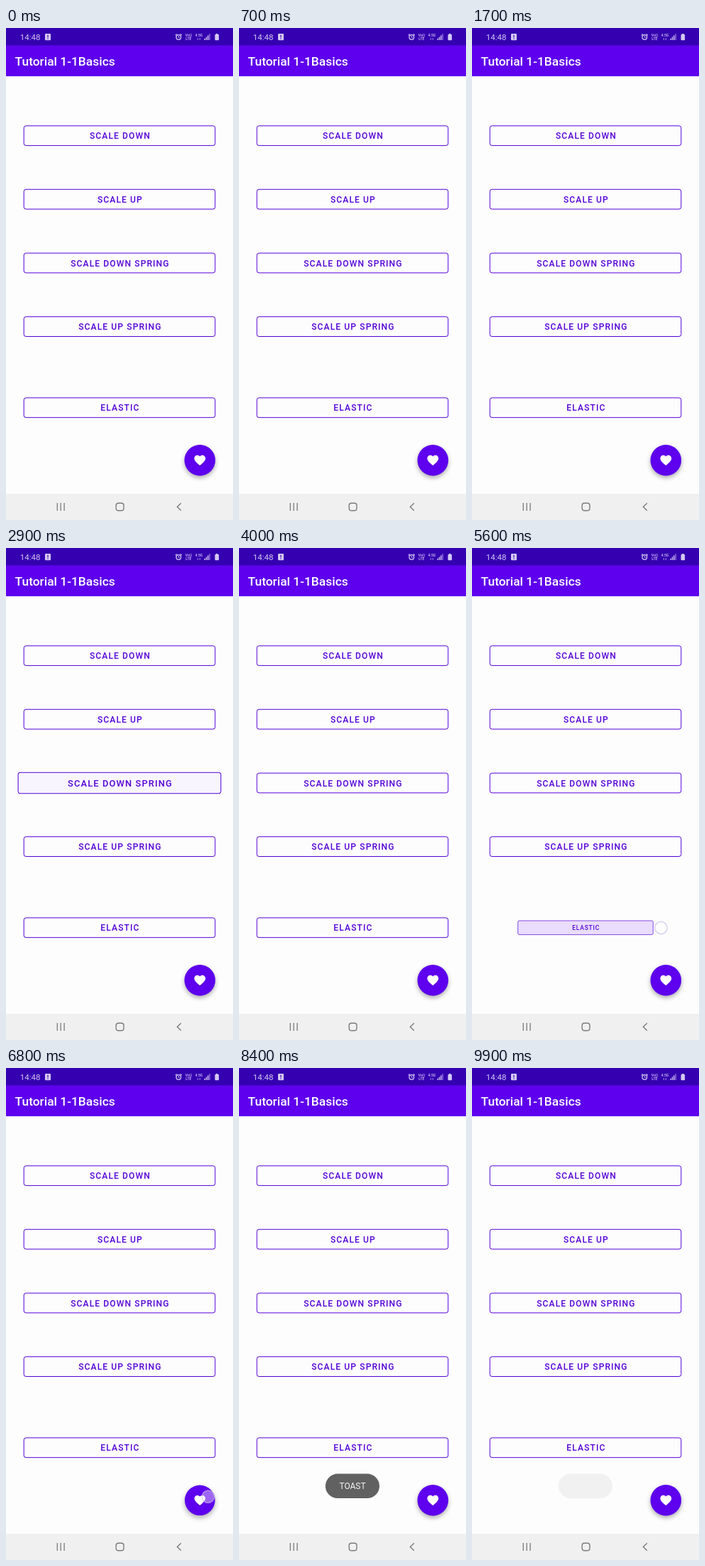
Animation of 320x693 px, one loop 10 s. Source, as an HTML page with a canvas:

```html
<!DOCTYPE html>
<html lang="en">
<head>
<meta charset="utf-8">
<title>Button animations</title>
<style>
  html, body { margin: 0; width: 100%; height: 100%; overflow: hidden; background: #fdfdfe; }
  canvas { display: block; width: 320px; height: 693px; }
</style>
</head>
<body>
<canvas id="stage"></canvas>
<script>
const W = 320, H = 693, LOOP = 10000, STEP = 100;
const canvas = document.getElementById('stage');
const ctx = canvas.getContext('2d');
const dpr = window.devicePixelRatio || 1;
canvas.width = W * dpr;
canvas.height = H * dpr;

const PURPLE = '#5e00ed', INK = '#5500d6';
const HEART = new Path2D('M12 21.35l-1.45-1.32C5.4 15.36 2 12.28 2 8.5 2 5.42 4.42 3 7.5 3' +
  'c1.74 0 3.41.81 4.5 2.09C13.09 3.81 14.76 3 16.5 3 19.58 3 22 5.42 22 8.5' +
  'c0 3.78-3.4 6.86-8.55 11.54L12 21.35z');

const BUTTONS = [
  ['SCALE DOWN', 151.7], ['SCALE UP', 241.2], ['SCALE DOWN SPRING', 331],
  ['SCALE UP SPRING', 420.6], ['ELASTIC', 534.8]
];
const FAB = 5;

// Each tap: start, length and hold in ms, peak scale, optional spring
const TAPS = [
  { id: 0, start: 300, len: 400, hold: 280, peak: 0.9 },
  { id: 1, start: 1300, len: 400, hold: 280, peak: 1.1 },
  { id: 2, start: 2500, len: 600, hold: 300, peak: 0.85, spring: true },
  { id: 3, start: 3500, len: 500, hold: 300, peak: 1.03, spring: true },
  { id: 4, start: 4500, len: 400, hold: 300, peak: 0.706 },
  { id: 4, start: 5400, len: 300, hold: 260, peak: 0.706 },
  { id: 4, start: 5900, len: 300, hold: 260, peak: 0.706 },
  { id: FAB, start: 6800, len: 1000, hold: 250, peak: 0.75, spring: true }
];

const clamp = x => Math.max(0, Math.min(1, x));
const easeInOut = x => x < 0.5 ? 2 * x * x : 1 - 2 * (1 - x) ** 2;

function pose(id, t) {
  const tap = TAPS.find(p => p.id === id && t >= p.start && t < p.start + p.len);
  if (!tap) return { scale: 1, press: 0, dot: 0 };
  const u = t - tap.start + 50;
  const v = Math.max(0, u - tap.hold);
  let amount = easeInOut(clamp(u / tap.hold));
  if (v > 0) {
    amount = tap.spring
      ? Math.exp(-0.0061 * v) * Math.cos(Math.PI * v / 150)
      : 1 - easeInOut(clamp(v / 120));
  }
  return {
    scale: 1 + (tap.peak - 1) * amount,
    press: clamp(u / 150) * (1 - clamp(v / 200)),
    dot: 1 - clamp(v / 90)
  };
}

function roundRect(x, y, w, h, r) {
  ctx.beginPath();
  ctx.roundRect(x, y, w, h, r);
}

function text(str, x, y, size, color, { weight = 400, align = 'left', spacing = 0 } = {}) {
  ctx.font = `${weight} ${size}px Roboto, sans-serif`;
  ctx.letterSpacing = spacing + 'px';
  ctx.textAlign = align;
  ctx.fillStyle = color;
  ctx.fillText(str, x, y);
}

function line(color, width, ...pts) {
  ctx.beginPath();
  for (let i = 0; i < pts.length; i += 2) ctx.lineTo(pts[i], pts[i + 1]);
  ctx.strokeStyle = color;
  ctx.lineWidth = width;
  ctx.stroke();
}

function circle(x, y, r) {
  ctx.beginPath();
  ctx.arc(x, y, r, 0, Math.PI * 2);
}

function rect(color, x, y, w, h) {
  ctx.fillStyle = color;
  ctx.fillRect(x, y, w, h);
}

function touchDot(x, y, alpha) {
  if (alpha <= 0) return;
  ctx.save();
  ctx.globalAlpha = alpha;
  circle(x, y, 8.7);
  ctx.fillStyle = 'rgba(255,255,255,.4)';
  ctx.fill();
  ctx.strokeStyle = 'rgba(196,184,226,.65)';
  ctx.lineWidth = 1.5;
  ctx.stroke();
  ctx.restore();
}

function statusBar() {
  const pale = '#d5c8f3', bar = '#3400b0';
  rect(bar, 0, 0, W, 24.5);
  text('14:48', 19.8, 17, 11.5, pale);

  roundRect(55, 8, 8, 9.2, 1);
  ctx.fillStyle = pale;
  ctx.fill();
  rect(bar, 58.4, 9.8, 1.2, 3.4);
  rect(bar, 58.4, 14.2, 1.2, 1.3);

  circle(243.3, 13, 3.3);
  ctx.strokeStyle = pale;
  ctx.lineWidth = 1.3;
  ctx.stroke();
  line(pale, 1, 243.3, 11, 243.3, 13.2, 244.8, 13.8);
  line(pale, 1.2, 238.8, 10.4, 240.8, 8.5);
  line(pale, 1.2, 245.8, 8.5, 247.8, 10.4);

  const small = { weight: 500, align: 'center' };
  text('Vo))', 257.6, 12.2, 5, pale, small);
  text('LTE', 257.4, 17.2, 5, pale, small);
  text('4.5G', 272, 12.2, 5, pale, small);
  line(pale, 0.7, 270.3, 14, 270.3, 17);
  line(pale, 0.7, 273.3, 14, 273.3, 17);

  for (let i = 0; i < 4; i++) {
    const h = 2.2 + i * 2.2;
    rect(i < 3 ? pale : 'rgba(213,200,243,.6)', 279.5 + i * 2.3, 17 - h, 1.4, h);
  }
  rect(pale, 295.9, 8, 2.6, 1.5);
  roundRect(294.5, 9, 5.6, 8.2, 1);
  ctx.fillStyle = pale;
  ctx.fill();
}

function navBar() {
  const gray = '#7b7b7b';
  rect('#f0f0f0', 0, 656, W, 37);
  for (const x of [72.3, 77.2, 82.1]) line(gray, 1.3, x, 669, x, 680);
  roundRect(155.2, 669.2, 10.8, 10.6, 3.3);
  ctx.strokeStyle = gray;
  ctx.lineWidth = 1.4;
  ctx.stroke();
  line(gray, 1.4, 246.8, 669.3, 241.4, 674.5, 246.8, 679.7);
}

function button([label, y], { scale, press, dot }) {
  ctx.save();
  ctx.translate(160, y);
  ctx.scale(scale, scale);
  roundRect(-134.8, -13.9, 269.6, 27.8, 3);
  ctx.fillStyle = `rgba(98,0,238,${0.13 * press})`;
  ctx.fill();
  ctx.strokeStyle = INK;
  ctx.lineWidth = 1;
  ctx.stroke();
  text(label, 0.9, 4.6, 12.1, INK, { weight: 500, align: 'center', spacing: 1.08 });
  ctx.restore();
  touchDot(266.5, y + 0.2, dot);
}

function fab({ scale, press, dot }) {
  ctx.save();
  ctx.translate(273.3, 608.9);
  ctx.scale(scale, scale);
  circle(0, 0, 21.8);
  ctx.shadowColor = 'rgba(0,0,0,.32)';
  ctx.shadowBlur = (6 + 3 * press) * dpr;
  ctx.shadowOffsetY = (3 + press) * dpr;
  ctx.fillStyle = PURPLE;
  ctx.fill();
  ctx.shadowColor = 'transparent';
  ctx.scale(0.79, 0.79);
  ctx.translate(-12, -12);
  ctx.fillStyle = '#fff';
  ctx.fill(HEART);
  ctx.restore();
  touchDot(285, 603.7, dot);
}

function toast(t) {
  const alpha = t < 9450 ? clamp((t - 7050) / 500) : clamp(1 - (t - 9400) / 540);
  if (alpha <= 0) return;
  ctx.save();
  ctx.globalAlpha = alpha;
  roundRect(121.8, 571.6, 76.2, 34.4, 17.2);
  ctx.fillStyle = '#616161';
  ctx.fill();
  text('TOAST', 160, 593, 12, '#f4f4f4', { align: 'center' });
  ctx.restore();
}

function draw(t) {
  ctx.setTransform(dpr, 0, 0, dpr, 0, 0);
  rect('#fdfdfe', 0, 0, W, H);
  rect(PURPLE, 0, 24, W, 44);
  statusBar();
  text('Tutorial 1-1Basics', 12.5, 52.8, 17.4, '#fff', { weight: 500 });
  BUTTONS.forEach((b, i) => button(b, pose(i, t)));
  fab(pose(FAB, t));
  toast(t);
  navBar();
}

const begin = performance.now();
function tick() {
  const t = (performance.now() - begin) % LOOP;
  draw(Math.floor(t / STEP) * STEP);
  requestAnimationFrame(tick);
}
tick();
</script>
</body>
</html>
```
